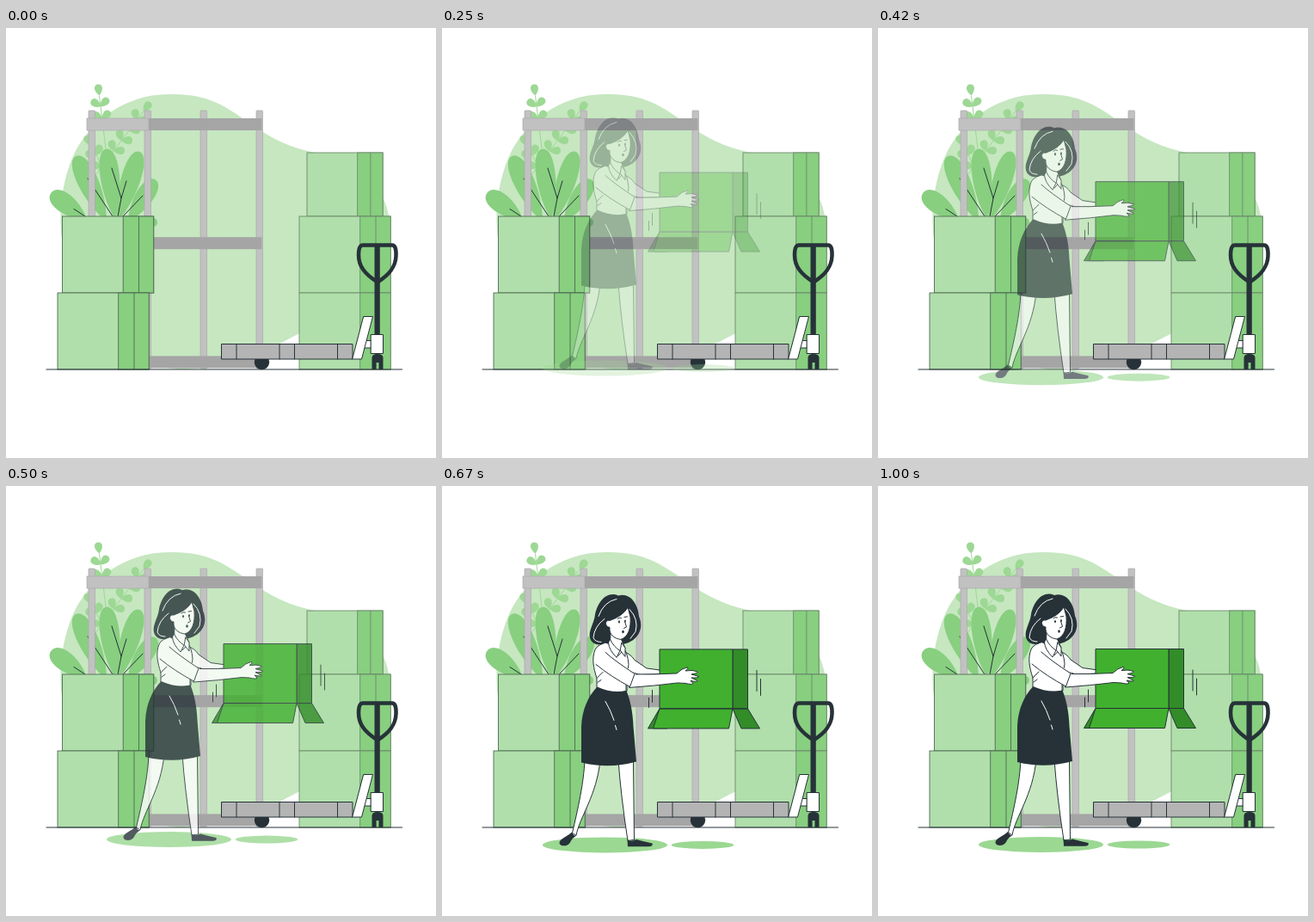
Recreate the animation shown at these times as an HTML page. Size 500 by 500 pixels, loop 1040 ms.

```html
<!DOCTYPE html>
<html lang="en">
<head>
<meta charset="utf-8">
<title>Warehouse packing</title>
<style>
  html, body { margin: 0; width: 100%; height: 100%; overflow: hidden; background: #fff; }
  svg { display: block; width: 100vw; height: 100vh; }
  .ink { fill: none; stroke: #263238; stroke-width: 1; stroke-linecap: round; stroke-linejoin: round; }
  .skin { fill: #fff; stroke: #263238; stroke-width: 1; stroke-linejoin: round; stroke-linecap: round; }
  .dark { fill: #263238; }
  .shine { fill: none; stroke: #fff; stroke-width: 1; stroke-linecap: round; }
  .carton { fill: #40b02e; stroke: #263238; stroke-width: 1; stroke-linejoin: round; }
  .shade { fill: #328c28; }
  .shadow { fill: #9bd892; }
  .steel { fill: #b4b4b4; }
  .pole { fill: #c2c1c2; stroke: #a9a9a9; stroke-width: .7; }
  .leaf { fill: #88cf80; }
  .sprig { fill: #9dd894; }
  .stem { fill: none; stroke: #9dd894; stroke-width: 1; }
</style>
</head>
<body>
<svg viewBox="0 0 500 500">
  <path fill="#c6e7c0" d="M66 250C60 218 65 177 79 147C95 113 134 77 190 77C235 76 255 91 281 109C309 129 331 140 365 146C409 154 438 180 445 218C452 263 430 310 390 330C360 346 345 353 328 362C290 383 245 397 205 397C140 397 75 320 66 250Z"/>

  <g id="plants"></g>
  <path class="ink" d="M79 210.500L92 219M95 175L124 219M123 163L134 198L130 219M140 178L134 198M159 195L136 219"/>
  <g id="shelf"></g>
  <g id="stacks"></g>

  <path class="ink" d="M47 397H460.500"/>

  <g id="truck">
    <circle class="dark" cx="297.500" cy="388.500" r="8.700"/>
    <path class="carton steel" d="M250.500 367.500H403V385H250.500Z"/>
    <path class="ink" d="M268 367.500V385M318 367.500V385M335.500 367.500V385M385.500 367.500V385"/>
    <path class="dark" d="M425.500 397V383Q426 379 432 379T438.500 383V397H433.500V389H430.500V397Z"/>
    <path class="dark" d="M428.500 252H434.800V357H428.500Z"/>
    <path fill="none" stroke="#263238" stroke-width="4.500" stroke-linejoin="round" d="M432 295.500C417 286 410 277 410 264Q410 252.500 415 252.500H449Q454 252.500 453.500 265C453 278 446 287 432 295.500Z"/>
    <path class="skin" d="M415 363.500H425V372H415Z"/>
    <path class="skin" d="M416 335.500H426.500L413.500 385H403Z"/>
    <path class="skin" d="M424.500 356.500H438.500V378.500H424.500Z"/>
  </g>

  <g id="packer" opacity="0">
    <ellipse class="shadow" cx="189.500" cy="417" rx="72.500" ry="9"/>
    <ellipse class="shadow" cx="303" cy="417" rx="36.300" ry="4.500"/>

    <g id="legs">
      <path class="skin" d="M166 318C165 345 158 375 151.500 403L156 406C160 384 180 360 184 318Z"/>
      <path class="skin" d="M205 318Q208 360 216 412L223.500 411L222.500 318Z"/>
      <path class="dark" d="M151 402C146 407 136 410 136.500 415C138 419 146 419 149 414Q151 409 156.500 406Q153 407 151 402Z"/>
      <path class="dark" d="M215.500 410.500Q220 414 226 410.500Q235 413 244.500 415Q246 418.500 240 418.800H216Z"/>
    </g>

    <g id="body">
      <path class="skin" d="M210 192Q219 194 224 202L238 211.500L256 214V218L230 219L214 214Z"/>
      <path class="skin" d="M195 180Q180 184 178 190C174 200 176 211 180 223V235Q198 243 215 238V220L217 207Q216 194 211 188L207 180Z"/>
      <path class="dark" d="M180.500 233Q198 241 214.500 237.500C219 249 222 263 222.500 279L226 320Q194 329 162 321V279C163 259 170 244 180.500 233Z"/>
      <path class="shine" d="M190 250Q196 260 200 272M201.500 278L203 283"/>
    </g>

    <g id="head">
      <path class="dark" d="M205 127C191 121 181 135 178 149C177 159 170 168 172 176C174 184 183 186 190 182C199 187 217 184 224 177C232 170 233 160 229 151C228 136 218 123 205 127Z"/>
      <path class="skin" d="M196 168L195.500 183L205 197L213 188L208 177Z"/>
      <path class="skin" d="M216 141Q210 151 195 156C189 155 189 163 195 164C194 172 200 177 208 178C217 175 220 164 219 152Z"/>
      <path class="shine" d="M203 131Q188 134 182 151M189 154Q177 163 176 176Q178 181 185 181M218 143Q229 154 225 169L219 177"/>
      <path class="ink" d="M204 154Q206 151.500 208.500 153M212 152L215.500 151.500M212.500 157L214.500 163.500L211.500 165"/>
      <ellipse class="dark" cx="206" cy="157.500" rx="1" ry="1.600"/>
      <ellipse class="dark" cx="213" cy="156.500" rx=".9" ry="1.500"/>
      <ellipse class="dark" cx="210.500" cy="169" rx="1.300" ry="1.700"/>
      <path class="skin" d="M195.500 178Q200 187 207 191L203 199Q194 190 193.500 182ZM209 182L213 188V198L207.500 191Z"/>
      <path class="ink" d="M180 223L187 216M181 228L185 225M214 222V238"/>
    </g>

    <g id="parcel">
      <path class="carton shade" d="M253 258.500L239.500 281.500H262L275 258.500Z"/>
      <path class="carton shade" d="M338 189.500H355.500V258.500H338ZM338 258.500H355.500L369.500 281.500H348Z"/>
      <path class="carton" d="M253 189.500H338V258.500H253ZM253 258.500H338L333.500 281.500H245.500Z"/>
      <path class="ink" d="M240.500 246V257M244.500 237V251M366 214V238M370.500 224V243"/>
    </g>

    <g id="arm">
      <path class="skin" d="M219 218.500Q247 219 273 217.500Q279 211.500 285 210.500Q288 211 283 214.500Q292 213 297 215.500Q299 217 290 218.500L298.500 221Q299 223 290 222.500L297 226Q298 228 289 226L292 229Q291 231 283 229L274 228.500Q247 232 218 234Z"/>
      <path fill="#fff" d="M180 192Q187 188 195 196L225 218L218.500 233Q195 222 178 207Z"/>
      <path class="ink" d="M190 193Q201 203 224 218L218.500 233Q196 221 179 207"/>
    </g>
  </g>
</svg>
<script>
  const NS = "http://www.w3.org/2000/svg";
  const byId = id => document.getElementById(id);
  const plants = byId("plants"), shelf = byId("shelf"), stacks = byId("stacks");

  function add(parent, tag, attrs) {
    const node = document.createElementNS(NS, tag);
    for (const key in attrs) node.setAttribute(key, attrs[key]);
    return parent.appendChild(node);
  }

  // A leaf grows from (x, y), turned clockwise from upright.
  function leaf(kind, x, y, angle, length, bulge) {
    add(plants, "path", {
      class: kind,
      d: `M0 0C${-bulge} ${-length * .4} ${-bulge} ${-length} 0 ${-length}C${bulge} ${-length} ${bulge} ${-length * .4} 0 0Z`,
      transform: `translate(${x} ${y}) rotate(${angle})`
    });
  }

  // A straight stem with an end leaf and pairs of leaves below it.
  function sprig(x, y, angle, length, pairs) {
    const dx = Math.sin(angle * Math.PI / 180), dy = -Math.cos(angle * Math.PI / 180);
    const at = d => [x + dx * d, y + dy * d];
    add(plants, "path", { class: "stem", d: `M${x} ${y}L${at(length)}` });
    leaf("sprig", ...at(length), angle, 13, 6);
    for (let i = 0; i < pairs; i++) {
      for (const turn of [-50, 50]) leaf("sprig", ...at(length - 13 - 15 * i), angle + turn, 13, 6);
    }
  }

  sprig(116, 140, -7, 62, 2);
  sprig(104, 171, 37, 93, 4);
  sprig(113, 163, -28, 30, 2);

  leaf("leaf", 94, 223, -53, 52, 15);
  leaf("leaf", 117, 225, -25, 84, 16);
  leaf("leaf", 127, 223, -7, 83, 15);
  leaf("leaf", 130, 225, 17, 85, 15);
  leaf("leaf", 142, 225, 33, 58, 14);
  leaf("leaf", 158, 226, 90, 18, 7);

  for (let x = 96; x < 300; x += 65) {
    add(shelf, "rect", { class: "pole", x, y: 96, width: 7.5, height: 300, rx: .8 });
  }
  for (let y = 105; y < 390; y += 138.2) {
    add(shelf, "rect", { x: 166, y, width: 131.5, height: 14, fill: "#a5a5a5" });
    add(shelf, "rect", { class: "pole", x: 94, y, width: 72, height: 14 });
  }

  function box(left, top, stroke, scale = 1) {
    const line = { stroke, "stroke-width": .9 };
    const height = 89 * scale, side = left + 70.7 * scale, tape = left + 89 * scale;
    add(stacks, "rect", { x: left, y: top, width: 106.2 * scale, height, fill: "#b0dfab", ...line });
    add(stacks, "rect", { x: side, y: top, width: 35.5 * scale, height, fill: "#88cf80", ...line });
    add(stacks, "path", { d: `M${tape} ${top}v${height}`, ...line });
  }

  const FAR = "#6d8a6c", NEAR = "#506a52";
  box(350, 145, FAR, .83);
  box(341, 219, FAR);
  box(341, 308, FAR);
  box(65.5, 219, NEAR);
  box(60, 308, NEAR);

  const LOOP = 1040, FPS = 24, DROP = 30;
  const packer = byId("packer");

  const bezier = (a, b, t) => 3 * a * t * (1 - t) ** 2 + 3 * b * t * t * (1 - t) + t ** 3;

  // Cubic ease that overshoots before it settles.
  function ease(x) {
    let low = 0, high = 1;
    for (let i = 0; i < 24; i++) {
      const mid = (low + high) / 2;
      if (bezier(.36, .5, mid) < x) low = mid; else high = mid;
    }
    return bezier(-.01, 1.38, low);
  }

  function draw(ms) {
    const step = Math.min(FPS, Math.floor((ms % LOOP + 6) * FPS / 1000));
    const progress = step < 2 ? 0 : ease(Math.min(1, (step + .75) / FPS));
    packer.setAttribute("opacity", Math.max(0, Math.min(1, progress)));
    packer.setAttribute("transform", `translate(0 ${DROP * (progress - 1)})`);
  }

  const start = performance.now();
  function tick() {
    draw(performance.now() - start);
    requestAnimationFrame(tick);
  }
  draw(0);
  requestAnimationFrame(tick);
</script>
</body>
</html>
```
